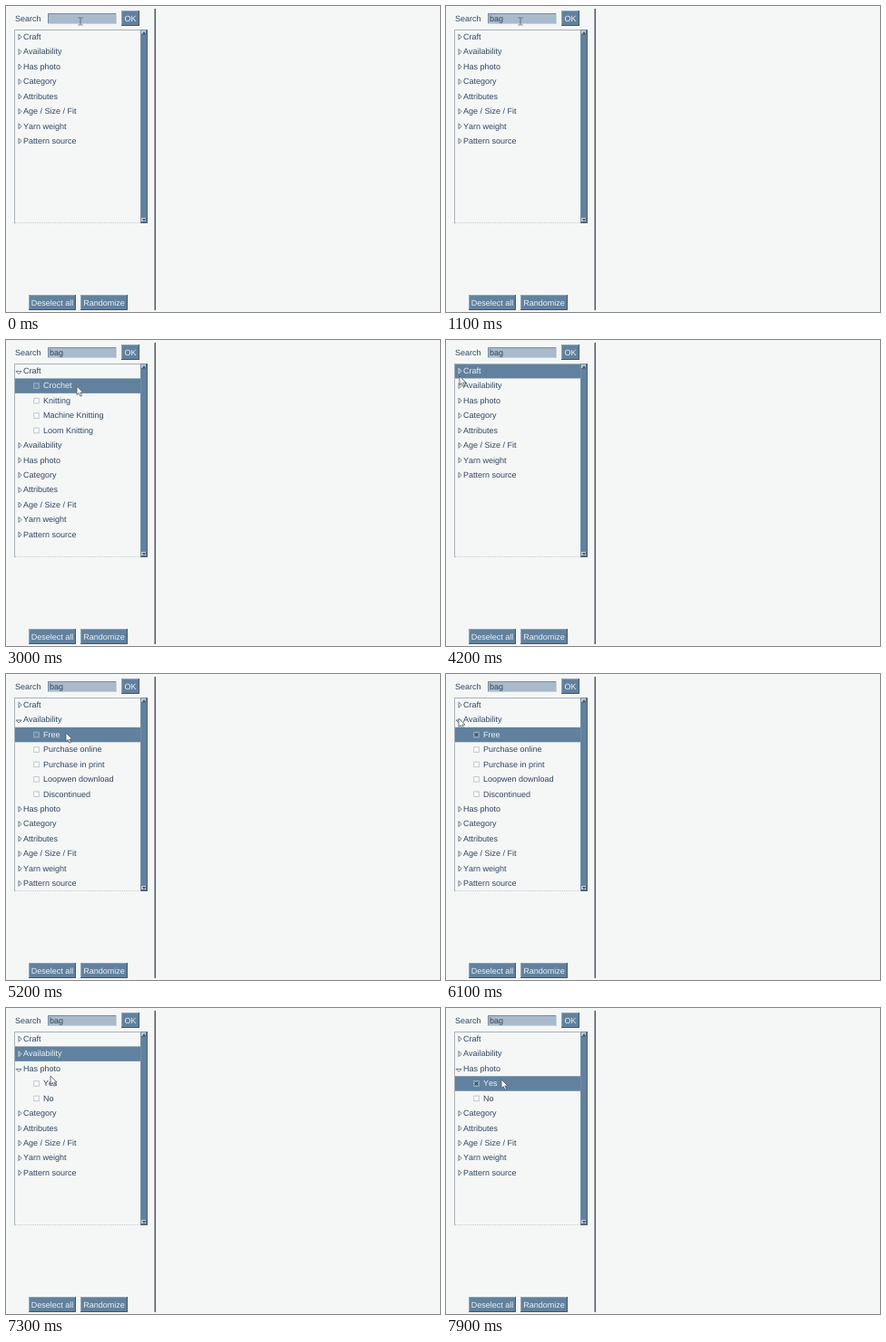
Write an HTML page that moves like this. It is 478 px wide and 338 px high and loops after 8000 ms.

```html
<!DOCTYPE html>
<html lang="en">
<head>
<meta charset="utf-8">
<title>Pattern search</title>
<style>
  html, body { margin: 0; width: 100%; height: 100%; overflow: hidden; background: #f5f7f7; }
  svg { display: block; width: 478px; height: 338px; }
  text {
    font: 9px "Liberation Sans", Arial, sans-serif; font-kerning: none;
    text-rendering: geometricPrecision; fill: #31465e; white-space: pre;
  }
  .edge { fill: none; stroke-width: 1; }
  .light { fill: #edf2f6; }
  .tri { fill: #f5f7f7; stroke: #4b6075; stroke-width: .8; }
  .box { fill: #fafbfb; stroke: #c3c7cb; stroke-width: 1; }
  .picked .box { fill: #6a89a4; stroke: #9db2c3; }
  .picked .tri { fill: #7390a9; stroke: #dde6ed; }
  .picked text { fill: #edf2f6; }
</style>
</head>
<body>
<svg viewBox="0 0 478 338">
  <rect width="478" height="338" fill="#f5f7f7"/>
  <rect x="163" y="3" width="1" height="333" fill="#a0a5ab"/>
  <rect x="164" y="3" width="1" height="333" fill="#53595f"/>
  <g id="widgets"></g>
  <text x="10" y="17">Search</text>
  <text id="query" x="48" y="17"></text>
  <rect id="caret" y="9" width="1" height="10" fill="#2a3a4b"/>
  <g id="tree"></g>
  <path class="edge" d="M9.5 240V26.5H148" stroke="#a9b0b6"/>
  <path class="edge" d="M10 239.5H148" stroke="#c3c8cc" stroke-dasharray="1 1"/>
  <path id="beam" d="M-2.5 -4H-.5M.5 -4H2.5M0 -4V4M-2.5 4H-.5M.5 4H2.5" fill="none" stroke="#5d666f" stroke-width=".9"/>
  <path id="arrow" d="M0 0V9.6L2.2 7.6L3.9 11.2L5.5 10.4L3.9 7H7Z" fill="#fafbfc" stroke="#50575f" stroke-width=".8"/>
</svg>
<script>
const LOOP = 8000, STEP = 100;
const TOP = 26, ROW = 16.43;
const BLUE = '#61819e';
const $ = id => document.getElementById(id);

const menu = [
  ['Craft', ['Crochet', 'Knitting', 'Machine Knitting', 'Loom Knitting']],
  ['Availability', ['Free', 'Purchase online', 'Purchase in print', 'Loopwen download', 'Discontinued']],
  ['Has photo', ['Yes', 'No']],
  ['Category'], ['Attributes'], ['Age / Size / Fit'], ['Yarn weight'], ['Pattern source']
];

// [time, x, y] of the pointer tip; straight eased moves between stops
const path = [
  [0, 82, 17], [1400, 82, 17], [1800, 55, 24], [2100, 24, 36], [2300, 14, 33],
  [2500, 14, 33], [2900, 78, 51], [3400, 78, 51], [3900, 15, 33], [4100, 15, 34],
  [4200, 15, 40], [4400, 14, 49], [4600, 14, 49], [5100, 66, 65], [5500, 66, 65],
  [6000, 14, 49], [6300, 14, 50], [6600, 14, 65], [6900, 14, 65], [7500, 61, 79], [8000, 61, 79]
];
const opened = [[2400, 4000, 'Craft'], [4500, 6200, 'Availability'], [6900, LOOP, 'Has photo']];
const picks = [[2900, 'Crochet'], [5100, 'Free'], [7600, 'Yes']];
const checks = { Crochet: 3200, Free: 5400, Yes: 7800 };
const keys = [500, 700, 900];

const bevel = (x, y, w, h, fill, lit, shade) =>
  `<rect x="${x}" y="${y}" width="${w}" height="${h}" fill="${fill}"/>
   <path class="edge" d="M${x + .5} ${y + h}V${y + .5}H${x + w}" stroke="${lit}"/>
   <path class="edge" d="M${x} ${y + h - .5}H${x + w - .5}V${y}" stroke="${shade}"/>`;

const button = (x, y, w, h, label) =>
  bevel(x, y, w, h, BLUE, '#8fa6b9', '#43586a') +
  `<text class="light" x="${x + w / 2}" y="${y + 12}" text-anchor="middle">${label}</text>`;

$('widgets').innerHTML =
  bevel(46, 8, 76, 12, '#a9bacb', '#7b8c9c', '#c6d1da') +
  button(127, 5, 20, 17, 'OK') +
  button(25, 319, 52, 17, 'Deselect all') +
  button(82, 319, 52, 17, 'Randomize') +
  bevel(148, 26, 8, 214, BLUE, '#6f8ca5', '#4b6276') +
  bevel(149, 27, 6, 5, '#b4c4d1', '#c5d1db', '#566c80') +
  bevel(149, 234, 6, 5, '#b4c4d1', '#c5d1db', '#566c80') +
  '<path d="M150 31L152 28L154 31ZM150 235L152 238L154 235Z" fill="#465b6d"/>';

function row(label, i, x, picked, icon) {
  const y = TOP + i * ROW;
  const bar = picked ? `<rect x="9" width="139" height="${ROW}" fill="${BLUE}"/>` : '';
  return `<g transform="translate(0 ${y.toFixed(2)})"${picked ? ' class="picked"' : ''}>
    ${bar}${icon}<text x="${x}" y="11">${label}</text></g>`;
}

function drawTree(t) {
  const open = (opened.find(([from, to]) => t >= from && t < to) || [])[2];
  const pick = (picks.filter(([at]) => t >= at).pop() || [])[1];
  let html = '', i = 0;
  for (const [name, kids = []] of menu) {
    const isOpen = name === open;
    const tri = `<path class="tri" d="${isOpen ? 'M11 8.6H17L14 11.6Z' : 'M14 5.2V11.2L17 8.2Z'}"/>`;
    html += row(name, i++, 19, !isOpen && kids.includes(pick), tri);
    if (!isOpen) continue;
    for (const kid of kids) {
      const mark = t >= checks[kid] ? '<path d="M31.7 6.4L35.3 10M35.3 6.4L31.7 10" stroke="#263645"/>' : '';
      html += row(kid, i++, 41, kid === pick, '<rect class="box" x="30.7" y="5.4" width="5.6" height="5.6"/>' + mark);
    }
  }
  $('tree').innerHTML = html;
}

function pointer(t) {
  const n = Math.max(1, path.findIndex(p => p[0] >= t));
  const [t0, x0, y0] = path[n - 1], [t1, x1, y1] = path[n];
  const p = (t - t0) / (t1 - t0), e = p * p * (3 - 2 * p);
  return [x0 + (x1 - x0) * e, y0 + (y1 - y0) * e];
}

function draw(t) {
  const typed = keys.filter(at => t >= at).length;
  $('query').textContent = 'bag'.slice(0, typed);
  $('caret').setAttribute('x', 48 + Math.round(typed * 4.7));
  const focused = t >= 300 && t < 2900;
  $('caret').style.display = focused && (t - 300) % 900 < 600 ? '' : 'none';

  drawTree(t);

  const [x, y] = pointer(t).map(Math.round);
  const overField = x >= 46 && x < 122 && y >= 8 && y < 20;
  for (const id of ['beam', 'arrow']) {
    $(id).setAttribute('transform', `translate(${x} ${y})`);
    $(id).style.display = (id === 'beam') === overField ? '' : 'none';
  }
}

const start = performance.now();
let last = -1;
function tick() {
  const t = Math.floor(((performance.now() - start) % LOOP) / STEP) * STEP;
  if (t !== last) draw(last = t);
  requestAnimationFrame(tick);
}
tick();
</script>
</body>
</html>
```
